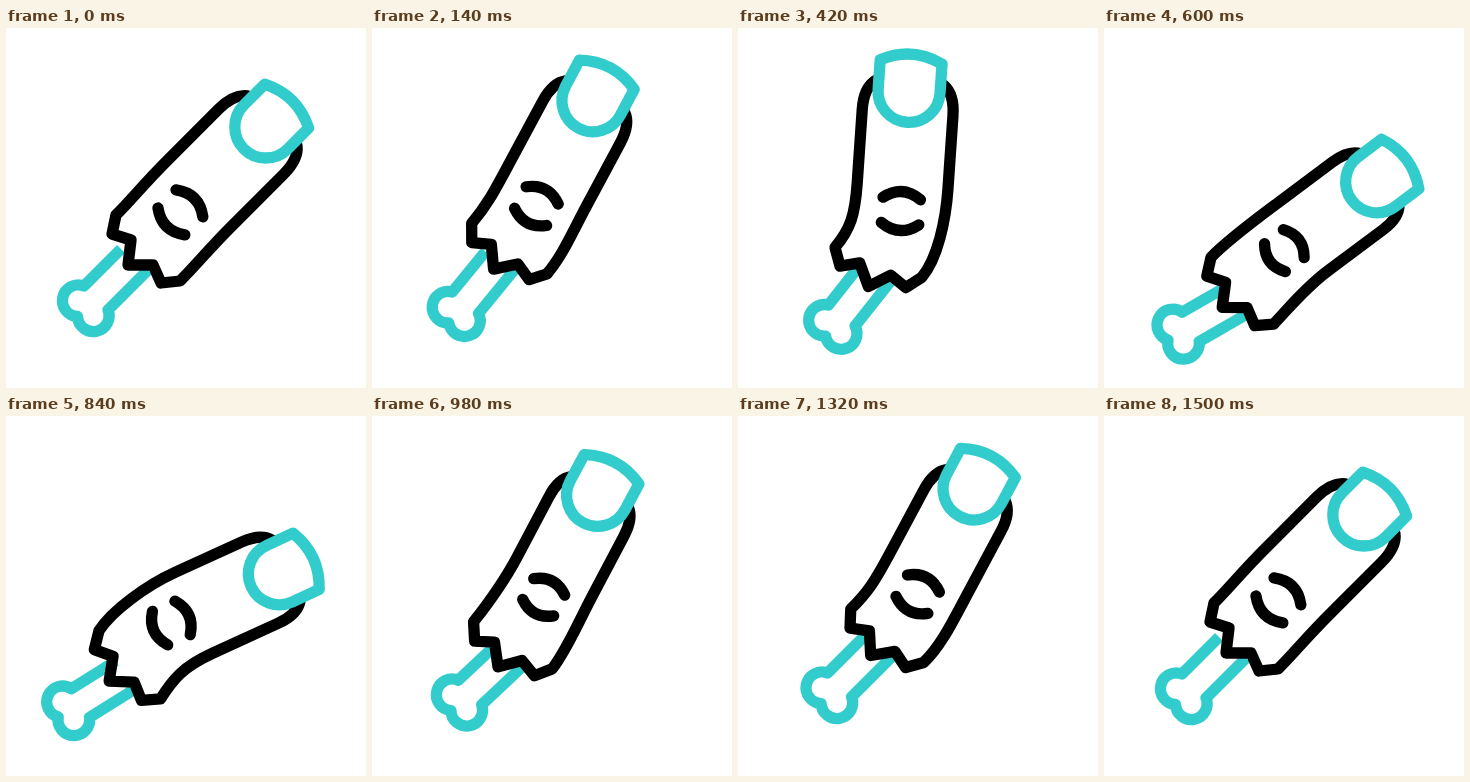
An HTML page that plays this animation: 360 by 360 pixels, repeating every 2.4 s.

```html
<!DOCTYPE html>
<html lang="en">
<head>
<meta charset="utf-8">
<title>Wiggling finger</title>
<style>
  html, body { margin: 0; width: 100%; height: 100%; overflow: hidden; background: #fff; }
  svg { display: block; width: 100vw; height: 100vh; }
  path { fill: none; stroke-width: 11.3; stroke-linejoin: round; }
  .ink { stroke: #000; stroke-linecap: round; }
  .teal { stroke: #33cccc; }
</style>
</head>
<body>
<svg viewBox="0 0 360 360">
  <g id="hand">
    <path id="bone" class="teal" d="M115 221 L78 258 A15.8 15.8 0 1 0 71.5 288.5 A15.8 15.8 0 1 0 102 282 L142 242"/>
    <path id="skin" class="ink"/>
    <path id="nail" class="teal" d="M-31 -29.5 Q0 -45 31 -29.5 V0 A31 31 0 0 1 -31 0 Z"/>
  </g>
</svg>
<script>
const LOOP = 2400, STEP = 20;
const PIVOT = [79.5, 280.5];
const SKIN = "M# C# # # L# C# # # L# # # # # # C# # # L# C# # # M# Q# # M# Q# #";

// Each pose places the tip and the torn end as [x, y, degrees];
// flare is the direction in which the skin meets the torn end.
const rest = { tip: [259.8, 99, 45], torn: [134, 227, 0], bone: [0, 0], flare: 45 };
const back = { tip: [204.7, 52, 9.1], torn: [152.4, 228.8, -20.6], bone: [24.6, -2], flare: 48 };
const forward = { tip: [240.2, 109.6, 57], torn: [100.7, 234, -9.8], bone: [-21.7, 4], flare: 16 };
const bends = [[0, rest], [375, back], [770, forward], [1125, back], [1500, rest]];

// Key points in their own frames; the side is mirrored
const side = [[46, 128], [46, 95], [46, 21], [46, 9], [43, -3], [35, -9]];
const teeth = [[-24, -40], [-28, -21], [-9, -15], [-12, 10], [13, 10], [21, 28], [40, 26]];

const $ = id => document.getElementById(id);
const rad = deg => deg * Math.PI / 180;
const lerp = (a, b, u) => a + (b - a) * u;
const lerpAll = (a, b, u) => a.map((v, i) => lerp(v, b[i], u));
const smooth = u => u * u * (3 - 2 * u);

function place([x, y, deg], [px, py]) {
  const c = Math.cos(rad(deg)), s = Math.sin(rad(deg));
  return [x + px * c - py * s, y + px * s + py * c];
}

// The two neighbouring keys and the eased progress between them
function between(keys, t) {
  const i = keys.findIndex(k => t < k[0]);
  if (i < 0) return [keys.at(-1)[1], keys.at(-1)[1], 0];
  const [t0, a] = keys[i - 1], [t1, b] = keys[i];
  return [a, b, smooth((t - t0) / (t1 - t0))];
}

const track = (t, ...keys) => lerp(...between(keys, t));

function outline({ tip, torn, flare }) {
  const onTip = p => place(tip, p);
  const end = teeth.map(p => place(torn, p));
  const handle = ([x, y]) => [x + 24 * Math.sin(rad(flare)), y - 24 * Math.cos(rad(flare))];
  const left = side.map(([x, y]) => onTip([-x, y])).reverse();
  const creases = [[108, -14], [133.5, 14]].flatMap(([y, arch]) =>
    [[-19, y], [0, y + arch], [19, y]].map(onTip));
  return [...left, handle(end[0]), ...end, handle(end[6]), ...side.map(onTip), ...creases];
}

function draw(t) {
  const [a, b, u] = between(bends, t);
  const from = outline(a), to = outline(b);
  const points = from.map((p, i) => lerpAll(p, to[i], u));
  $("skin").setAttribute("d", SKIN.replace(/#/g, () => points.shift().join(" ") + " "));

  // The nail stays rigid, so it swings on a slight arc
  const tip = lerpAll(a.tip, b.tip, u);
  const [x, y] = place(tip, [0, -18 * u * (1 - u)]);
  $("nail").setAttribute("transform", `translate(${x},${y}) rotate(${tip[2]})`);
  $("bone").setAttribute("transform", `translate(${lerpAll(a.bone, b.bone, u)})`);

  const swing = track(t, [0, 0], [310, -13.3], [700, 20.5], [1040, 0]);
  const dx = track(t, [0, 0], [340, -8.5], [700, -0.5], [1040, 0]);
  const dy = t < 1100 ? 25.5 * Math.sin(Math.PI * t / 1100) ** 1.35 : 0;
  $("hand").setAttribute("transform", `translate(${dx},${dy}) rotate(${swing},${PIVOT})`);
}

const start = performance.now();
function tick() {
  const t = (performance.now() - start) % LOOP;
  draw(Math.floor(t / STEP) * STEP);
  requestAnimationFrame(tick);
}
tick();
</script>
</body>
</html>
```
